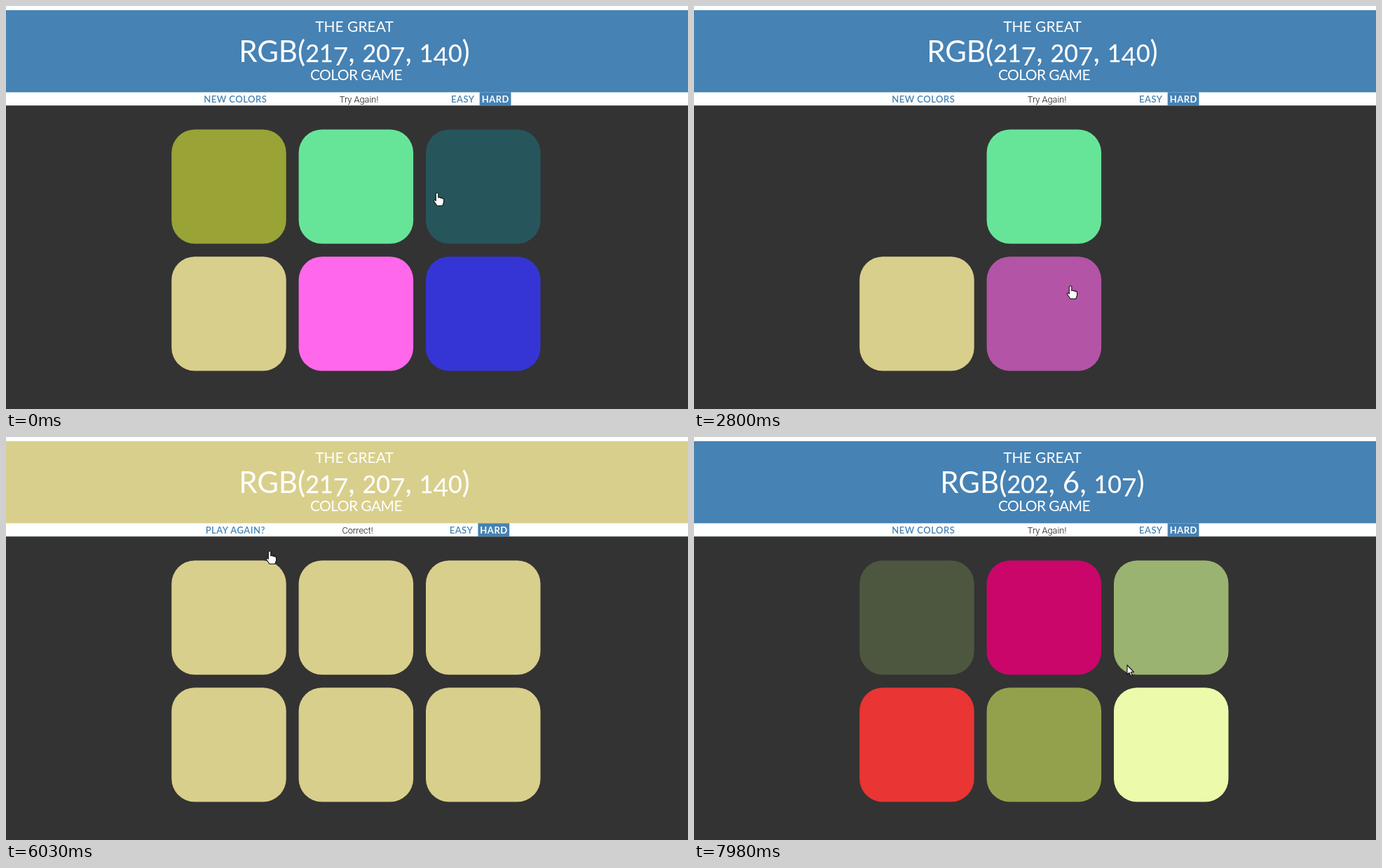
These frames come from a looping animation (973x576 px, 8 s). An HTML page:

```html
<!DOCTYPE html>
<html lang="en">
<head>
<meta charset="utf-8">
<title>Color game</title>
<style>
  html, body { margin: 0; width: 100%; height: 100%; overflow: hidden; background: #333; }
  svg { display: block; width: 100%; height: 100%; }
  text { text-anchor: middle; font-family: Lato, sans-serif; }
  .head { fill: #fff; font-size: 21px; }
  .tight { letter-spacing: -.6px; }
  #code { font-size: 42px; }
  .small { font-size: 34px; stroke: #fff; stroke-width: .3px; }
  .low { font-size: 37px; baseline-shift: -5px; }
  .nav { font-size: 13px; font-weight: 600; letter-spacing: .5px; fill: #4682b4; }
  .chosen { fill: #fff; font-weight: 700; }
  #status { font: 300 12.8px Roboto, sans-serif; fill: #111; }
  .cursor { fill: #fff; stroke: #111; stroke-width: 1.1px; stroke-linejoin: round; }
</style>
</head>
<body>
<svg viewBox="0 0 973 576">
  <rect width="973" height="142.2" fill="#fdfffe"/>
  <rect id="header" y="6" width="973" height="117.3"/>
  <text class="head" x="497" y="37">THE GREAT</text>
  <text class="head" x="497" y="80" id="code"></text>
  <text class="head tight" x="499.5" y="106">COLOR GAME</text>
  <rect id="buttonBack" x="278.5" y="123.3" width="98" height="18.9" fill="#4682b4"/>
  <text class="nav" x="327.3" y="137.5" id="button"></text>
  <text id="status" y="137.5"></text>
  <g id="levels">
    <text class="nav" x="651.8" y="137.5">EASY</text>
    <rect x="675.7" y="123.3" width="44.8" height="18.9" fill="#4682b4"/>
    <text class="nav chosen" x="698.3" y="137.5">HARD</text>
  </g>
  <g id="squares"></g>
  <path id="hand" class="cursor" d="M-1.7 1.5Q-1.5 0 0 0 1.6 0 1.8 1.5V7Q3.8 5.8 5 7.4 7 6.6 7.8 8.2 9.6 7.8 9.6 10V13.5L7.8 18.5H0L-4.8 11.5Q-4.6 9.2-1.7 11.4Z"/>
  <path id="arrow" class="cursor" d="M0 0V13.5L3 10.8 5 15.5 7.2 14.5 5.2 10H9.5Z"/>
</svg>
<script>
const LOOP = 8000, TICK = 139, FIRST_TICK = 10, FADE = 600;
const WON = 5100, RESET = 6825, MISS = 7615;
const HOVER_IN = 6090, HOVER_OUT = 7020, LEAVES_SQUARE = 7900;
const SPEED = .6; // cursor pixels per ms

const $ = id => document.getElementById(id);
const rgb = hex => [1, 3, 5].map(i => parseInt(hex.slice(i, i + 2), 16));
const css = color => `rgb(${color.map(Math.round)})`;
const mix = (a, b, k) => a.map((v, i) => v + (b[i] - v) * k);
const [DARK, STEEL, KHAKI, WHITE] = ['#333333', '#4682b4', '#d9cf8c', '#ffffff'].map(rgb);

const squares = [
  { first: '#99a336', next: '#cdff7b', clicked: 704 },
  { first: '#66e598', next: '#ca066b', clicked: 3830 },
  { first: '#1e6a74', next: '#9bb370', clicked: -140 },
  { first: '#d9cf8c', next: '#e93533' },
  { first: '#ff68ea', next: '#94a14c', clicked: 2650 },
  { first: '#3535d6', next: '#ecfaac', clicked: 1690 }
].map(({ first, next, clicked }, i) => {
  const node = document.createElementNS('http://www.w3.org/2000/svg', 'rect');
  const column = i % 3, row = Math.floor(i / 3);
  const box = { x: 236.2 + column * 181.4, y: 176.6 + row * 181.7, width: 163.5, height: 163.1, rx: 33 };
  for (const key in box) node.setAttribute(key, box[key]);
  $('squares').append(node);

  const changes = [[WON, KHAKI], [RESET, rgb(next)]];
  if (clicked) changes.unshift([clicked, DARK]);
  if (i === 0) changes.push([MISS, DARK]);
  return { node, first: rgb(first), changes };
});

// Places where the cursor rests
const stops = [
  { x: 615, y: 267, arrive: 0 },
  { x: 360, y: 272, arrive: 560 },
  { x: 665, y: 430, arrive: 1650 },
  { x: 537, y: 400, arrive: 2340 },
  { x: 510, y: 241, arrive: 3680 },
  { x: 289, y: 422, arrive: 4950 },
  { x: 376, y: 163, arrive: 5980 },
  { x: 340, y: 132, arrive: 6280 },
  { x: 379, y: 235, arrive: 7095 },
  { x: 618, y: 326, arrive: 7930 }
];

const clamp = k => Math.min(1, Math.max(0, k));
const smooth = k => k * k * (3 - 2 * k);

// CSS "ease", cubic-bezier(.25, .1, .25, 1)
function ease(x) {
  x = clamp(x);
  let low = 0, high = 1, u = x;
  for (let i = 0; i < 20; i++) {
    u = (low + high) / 2;
    if (.75 * u * (1 - u) + u ** 3 < x) low = u; else high = u;
  }
  return .3 * u * (1 - u) ** 2 + 3 * u * u * (1 - u) + u ** 3;
}

function cursorAt(t) {
  let at = [stops[0].x, stops[0].y];
  for (const { x, y, arrive } of stops.slice(1)) {
    const travel = Math.hypot(x - at[0], y - at[1]) / SPEED;
    if (t < arrive - travel) break;
    at = mix(at, [x, y], smooth(clamp(1 - (arrive - t) / travel)));
    if (t < arrive) break;
  }
  return at;
}

// Old-style figures: 0 1 2 are low, 3 4 5 7 9 hang below the line
const figures = text => text.replace(/[0-2]+|[34579]+/g, run =>
  `<tspan class="${run[0] < 3 ? 'small' : 'low'}">${run}</tspan>`);

function draw(now) {
  // The picture refreshes once per tick
  const t = Math.max(0, Math.floor((now % LOOP - FIRST_TICK) / TICK) * TICK + FIRST_TICK);
  const won = t >= WON && t < RESET, reset = t >= RESET;

  for (const { node, first, changes } of squares) {
    const color = changes.reduce((c, [at, to]) => mix(c, to, ease((t - at) / FADE)), first);
    node.setAttribute('fill', css(color));
  }

  $('header').setAttribute('fill', css(won ? KHAKI : STEEL));
  $('code').innerHTML = figures(reset ? 'RGB(202, 6, 107)' : 'RGB(217, 207, 140)');

  const hover = ease((t - HOVER_IN) / FADE) * (1 - ease((t - HOVER_OUT) / FADE));
  $('buttonBack').setAttribute('opacity', hover);
  $('button').style.fill = css(mix(STEEL, WHITE, hover));
  $('button').textContent = won ? 'PLAY AGAIN?' : 'NEW COLORS';
  $('status').textContent = won ? 'Correct!' : reset && t < MISS ? '' : 'Try Again!';
  $('status').setAttribute('x', won ? 501.5 : 503.5);
  $('levels').setAttribute('transform', `translate(${won ? -2.3 : 0})`);

  const shown = t > LEAVES_SQUARE ? 'arrow' : 'hand';
  for (const id of ['hand', 'arrow']) {
    $(id).setAttribute('transform', `translate(${cursorAt(t)})`);
    $(id).setAttribute('visibility', id === shown ? 'visible' : 'hidden');
  }
}

const begin = performance.now();
function frame() {
  draw(performance.now() - begin);
  requestAnimationFrame(frame);
}
frame();
</script>
</body>
</html>
```
